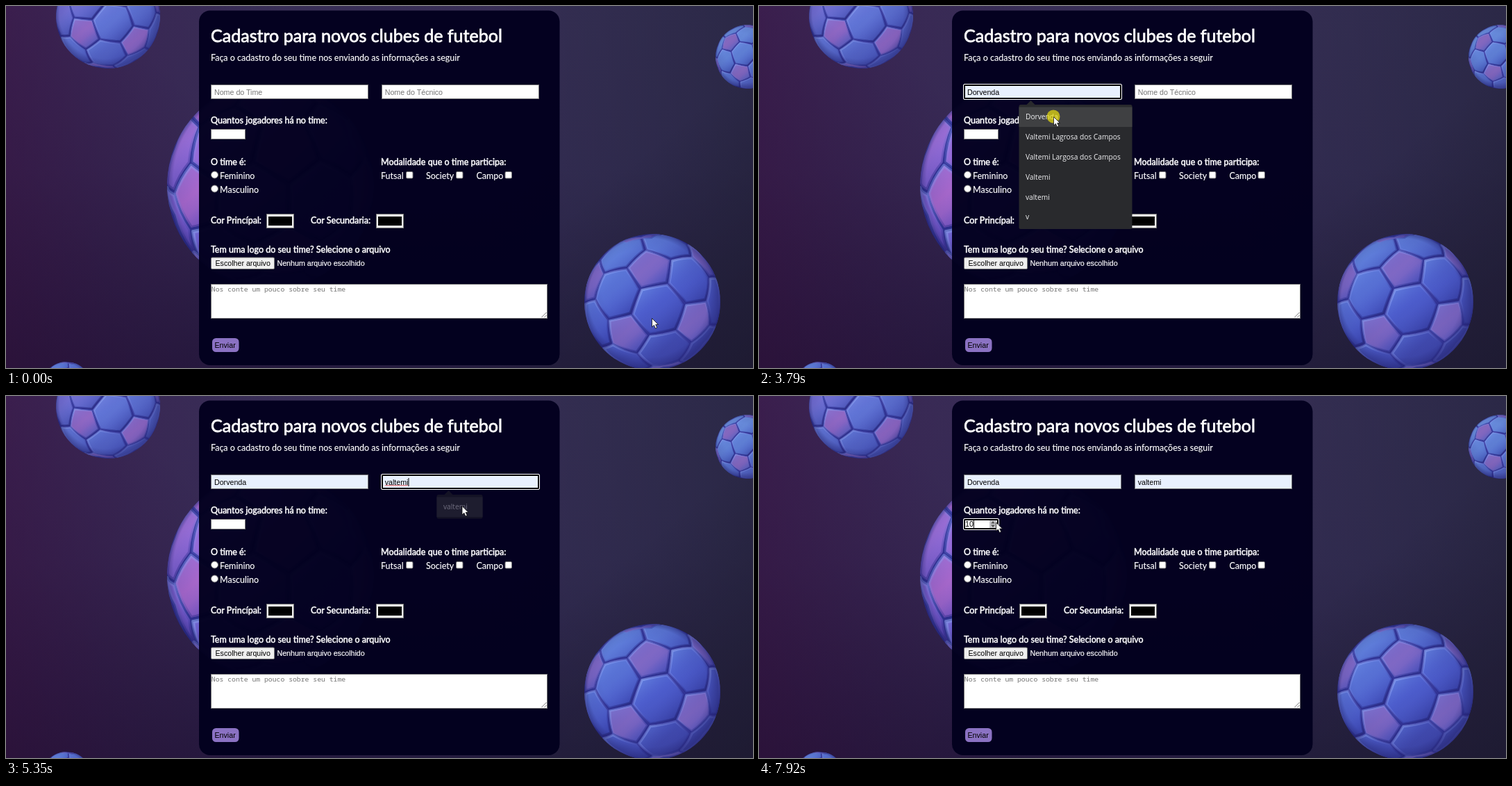
Write an HTML page with a canvas that moves like this. It is 1076 by 521 pixels and loops after 7.99 s.

```html
<!DOCTYPE html>
<html lang="pt-BR">
<head>
<meta charset="utf-8">
<title>Cadastro de clubes</title>
<style>
  html, body { margin: 0; width: 100%; height: 100%; overflow: hidden; background: #2f2650; }
  canvas, svg { position: absolute; left: 0; top: 0; width: 1076px; height: 521px; }
  text { font: 12.5px Lato, sans-serif; fill: #fff; white-space: pre; }
  .title { font-size: 25.05px; stroke: #fff; stroke-width: .8px; }
  .plain text { stroke: #fff; stroke-width: .15px; }
  .label text { stroke: #fff; stroke-width: .5px; }
  .ui text { font: 10.67px "Liberation Sans", Arial, sans-serif; fill: #000; }
  .ui .hint { fill: #757575; }
  .ui .mono { font: 9.78px "Noto Sans Mono", monospace; fill: #757575; }
  .ui .light { fill: #fff; stroke: #fff; stroke-width: .2px; }
  .box { fill: #fff; stroke: #767676; }
  .gray { fill: #efefef; stroke: #767676; }
  .ring .outer { fill: none; stroke: #fff; }
  .ring .inner { fill: none; stroke: #000; stroke-width: 2; }
  .menu text { font: 10.2px "Open Sans", sans-serif; fill: #f1f1f3; }
  .menu .panel { fill: #292a2d; }
  .menu .row { fill: #3f4042; }
</style>
</head>
<body>
<canvas id="scene" width="1076" height="521"></canvas>
<svg viewBox="0 0 1076 521">
  <rect x="278" y="6.5" width="519.5" height="510.5" rx="16" fill="#03001e" fill-opacity=".97"/>
  <text class="title" x="295" y="52">Cadastro para novos clubes de futebol</text>

  <g class="plain">
    <text x="295" y="78.5">Faça o cadastro do seu time nos enviando as informações a seguir</text>
    <text x="308" y="248.5">Feminino</text>
    <text x="308" y="268.5">Masculino</text>
    <text x="540" y="248.5">Futsal</text>
    <text x="605" y="248.5">Society</text>
    <text x="677.5" y="248.5">Campo</text>
  </g>
  <g class="label">
    <text x="295" y="168.5">Quantos jogadores há no time:</text>
    <text x="295" y="228.5">O time é:</text>
    <text x="540" y="228.5">Modalidade que o time participa:</text>
    <text x="295" y="312.5">Cor Princípal:</text>
    <text x="439" y="312.5">Cor Secundaria:</text>
    <text x="295" y="354.5">Tem uma logo do seu time? Selecione o arquivo</text>
  </g>

  <g class="box">
    <circle cx="300.5" cy="243" r="5"/>
    <circle cx="300.5" cy="263" r="5"/>
    <rect x="576.5" y="238.5" width="9.5" height="9.5" rx="1.5"/>
    <rect x="648.5" y="238.5" width="9.5" height="9.5" rx="1.5"/>
    <rect x="719" y="238.5" width="9.5" height="9.5" rx="1.5"/>
    <rect id="field1" x="295.5" y="113.5" width="226" height="20"/>
    <rect id="field2" x="541.5" y="113.5" width="226" height="20"/>
    <rect x="295.5" y="177.5" width="49" height="14"/>
    <rect x="295.5" y="400.5" width="484" height="49"/>
  </g>
  <path d="M771.5 448l7-7M775.5 448l3-3" stroke="#666" stroke-width=".9"/>
  <g class="gray">
    <rect x="375.5" y="299.5" width="39" height="20"/>
    <rect x="533.5" y="299.5" width="39" height="20"/>
    <rect x="295.5" y="362" width="91" height="16.5" rx="1.5"/>
  </g>
  <path d="M378 303h34v13h-34zM536 303h34v13h-34z"/>
  <rect x="297" y="478" width="38.5" height="20" rx="5.5" fill="#8b72c3"/>

  <g class="ui">
    <text x="301.5" y="374">Escolher arquivo</text>
    <text x="390.5" y="374" class="light">Nenhum arquivo escolhido</text>
    <text x="295.8" y="411" class="mono">Nos conte um pouco sobre seu time</text>
    <text x="300.5" y="492">Enviar</text>
    <text id="hint1" x="300" y="127.5" class="hint">Nome do Time</text>
    <text id="hint2" x="545.7" y="127.5" class="hint">Nome do Técnico</text>
    <text id="value1" x="300" y="127.5">Dorvenda</text>
    <text id="value2" x="545.7" y="127.5">valtemi</text>
    <g id="spinner">
      <rect id="spinHover" x="332" y="179" width="10.5" height="11" fill="#c4c4c8"/>
      <path d="M334 183.5l3-3.4 3 3.4zM334 185.5l3 3.4 3-3.4z" fill="#555"/>
    </g>
    <text id="count" x="297" y="188.3"></text>
  </g>
  <path id="squiggle" fill="none" stroke="#e02020" stroke-width=".8"/>

  <g class="ring" id="ring1">
    <rect class="outer" x="294.5" y="112.5" width="228" height="22" rx="1.5"/>
    <rect class="inner" x="296" y="114" width="225" height="19" rx="1"/>
  </g>
  <g class="ring" id="ring2">
    <rect class="outer" x="540.5" y="112.5" width="228" height="22" rx="1.5"/>
    <rect class="inner" x="542" y="114" width="225" height="19" rx="1"/>
  </g>
  <g class="ring" id="ring3">
    <rect class="outer" x="294.5" y="176.5" width="51" height="16" rx="1.5"/>
    <rect class="inner" x="296" y="178" width="48" height="13" rx="1"/>
  </g>
  <rect id="caret" width="1" height="12"/>

  <g class="menu" id="menu1">
    <path class="panel" d="M384.5 143l7-7 7 7z"/>
    <rect class="panel" x="374.5" y="142" width="163" height="179" rx="2.5"/>
    <rect class="row" id="row1" x="374.5" y="145.5" width="163" height="28.5"/>
    <g id="names"></g>
  </g>
  <g class="menu" id="menu2">
    <path class="panel" d="M630.5 143l7-7 7 7z"/>
    <rect class="panel" x="620.5" y="142" width="66" height="34.5" rx="2.5"/>
    <rect class="row" id="row2" x="620.5" y="145.5" width="66" height="28.5"/>
    <text x="630" y="163.3">valtemi</text>
  </g>

  <g id="pointer">
    <circle id="click" r="9.5" fill="#f0e50c" fill-opacity=".68"/>
    <path id="arrow" d="M.5 .5V13l2.9-2.7 2 4.7 2.3-1-2-4.5h3.8z" fill="#fff" stroke="#111" stroke-width=".8"/>
    <path id="beam" d="M-2.5-6h2L0-5.5 .5-6h2M0-5.5v11M-2.5 6h2L0 5.5 .5 6h2" fill="none" stroke="#000"/>
  </g>
</svg>
<script>
const $ = id => document.getElementById(id);

// ---- Backdrop ----
const ctx = $('scene').getContext('2d');

function gradient(shape, stops) {
  const g = shape.length === 4 ? ctx.createLinearGradient(...shape) : ctx.createRadialGradient(...shape);
  stops.forEach(([at, color]) => g.addColorStop(at, color));
  return g;
}

function wash(shape, stops) {
  ctx.fillStyle = gradient(shape, stops);
  ctx.fillRect(0, 0, 1076, 521);
}

const dot = (a, b) => a[0] * b[0] + a[1] * b[1] + a[2] * b[2];
const mix = (a, b, k) => a.map((v, i) => v + (b[i] - v) * k);
const norm = a => a.map(v => v / Math.hypot(...a));
const cross = (a, b) => [a[1] * b[2] - a[2] * b[1], a[2] * b[0] - a[0] * b[2], a[0] * b[1] - a[1] * b[0]];
const lift = ([x, y]) => [x, y, Math.sqrt(Math.max(0, 1 - x * x - y * y))];
const perpendicular = (a, axis) => norm(a.map((v, i) => v - dot(a, axis) * axis[i]));
const adjacent = (a, b) => Math.abs(dot(a, b) - 1 / Math.sqrt(5)) < .01;

// Twelve pentagon centres, turned so one sits at `first` and a neighbour lies towards `second`.
function pentagonCentres(first, second) {
  const z = norm(lift(first)), x = perpendicular(lift(second), z), y = cross(z, x);
  const half = [z];
  for (let k = 0; k < 5; k++) {
    const a = k * Math.PI * .4;
    half.push(z.map((v, i) => (v + 2 * (x[i] * Math.cos(a) + y[i] * Math.sin(a))) / Math.sqrt(5)));
  }
  return [...half, ...half.map(v => v.map(c => -c))];
}

function hexagonCentres(pents) {
  const found = [];
  pents.forEach((a, i) => pents.slice(i + 1).forEach((b, j) => pents.slice(i + j + 2).forEach(c => {
    if (adjacent(a, b) && adjacent(b, c) && adjacent(a, c)) found.push(norm(a.map((v, k) => v + b[k] + c[k])));
  })));
  return found;
}

// Outline of the panel around a centre, pulled in a little and curved along the sphere.
function panel(centre, sides, corners) {
  const u = perpendicular(Math.abs(centre[0]) < .8 ? [1, 0, 0] : [0, 1, 0], centre), w = cross(centre, u);
  const angle = p => Math.atan2(dot(p, w), dot(p, u));
  const own = [...corners].sort((a, b) => dot(b, centre) - dot(a, centre)).slice(0, sides)
    .sort((a, b) => angle(a) - angle(b)).map(p => mix(p, centre, .07));
  const path = new Path2D();
  own.forEach((p, i) => {
    for (let k = 0; k < 4; k++) path.lineTo(...norm(mix(p, own[(i + 1) % sides], k / 4)));
  });
  path.closePath();
  return path;
}

function ball(cx, cy, r, first, second, [light, mid, dark], patch) {
  const pents = pentagonCentres(first, second);
  const corners = pents.flatMap(a => pents.filter(b => adjacent(a, b)).map(b => norm(mix(a, b, 1 / 3))));
  ctx.save();
  ctx.translate(cx, cy);
  ctx.scale(r, r);
  ctx.beginPath();
  ctx.arc(0, 0, 1, 0, 7);
  ctx.clip();
  ctx.fillStyle = '#35379a';
  ctx.fill();
  ctx.lineJoin = 'round';
  const body = gradient([-.6, -.8, .5, 1], [[0, light], [.5, mid], [1, dark]]);

  const drawPanel = (centre, sides) => {
    if (centre[2] < -.1) return;
    const [x, y] = centre, path = panel(centre, sides, corners);
    const across = stops => gradient([x - .26, y - .3, x + .26, y + .3], stops);
    const paint = color => {
      ctx.fillStyle = color;
      ctx.fill(path);
    };
    paint(body);
    if (sides === 5) paint(across([[0, patch], [.6, patch], [1, body === patch ? patch : mid]]));
    paint(across([[0, 'rgba(125,165,245,.34)'], [.45, 'rgba(80,95,215,0)'], [1, 'rgba(30,32,130,.42)']]));
    ctx.lineWidth = .035;
    ctx.strokeStyle = across([[0, 'rgba(150,175,250,.6)'], [.4, 'rgba(130,145,240,.25)'], [.7, 'rgba(40,42,140,.35)'], [1, 'rgba(32,32,110,.6)']]);
    ctx.stroke(path);
  };
  hexagonCentres(pents).forEach(c => drawPanel(c, 6));
  pents.forEach(c => drawPanel(c, 5));

  ctx.fillStyle = gradient([-.25, -.25, .5, 0, 0, 1], [[0, 'rgba(28,26,95,0)'], [.75, 'rgba(28,26,95,.1)'], [1, 'rgba(28,26,95,.5)']]);
  ctx.fillRect(-1, -1, 2, 2);
  ctx.restore();
}

wash([0, 0, 0, 521], [[0, '#393056'], [.45, '#362d54'], [1, '#251d40']]);
wash([0, 0, 400, 0], [[0, 'rgba(66,16,76,.5)'], [1, 'rgba(50,25,85,.05)']]);
wash([0, 521, 330, 180], [[0, 'rgba(30,12,40,.4)'], [1, 'rgba(30,12,40,0)']]);
wash([700, 0, 1076, 0], [[0, 'rgba(36,40,66,0)'], [.3, 'rgba(36,40,66,.3)'], [1, 'rgba(34,36,60,.6)']]);
wash([860, 260, 1076, 521], [[0, 'rgba(26,22,42,0)'], [1, 'rgba(26,22,42,.6)']]);

const blue = ['#6284dc', '#4c5ccb', '#3b409f'];
ball(147, 15, 75, [-.48, .33], [.5, .49], ['#7f68cc', '#6074d4', '#4a58bc'], '#9068c4');
ball(1068, 73, 46, [-.22, .52], [-.55, -.45], ['#6c92dc', '#5a78d0', '#4a52b0'], '#8568be');
ball(381, 258, 149, [-.74, .13], [-.6, -.72], ['#a676dc', '#7758d0', '#5048b8'], '#a868cc');
ball(931, 426, 98, [-.03, -.5], [-.36, .38], blue, '#7f68c4');
ball(87, 549, 37, [.1, -.5], [-.5, .4], blue, '#7b6cc4');

// ---- Form activity ----
['Dorvenda', 'Valtemi Lagrosa dos Campos', 'Valtemi Largosa dos Campos', 'Valtemi', 'valtemi', 'v'].forEach((name, i) => {
  const node = document.createElementNS('http://www.w3.org/2000/svg', 'text');
  node.setAttribute('x', 384);
  node.setAttribute('y', 163.3 + 28.8 * i);
  node.textContent = name;
  $('names').append(node);
});
$('squiggle').setAttribute('d', 'M546 129.5' + 'l1.5-1.5 1.5 1.5'.repeat(11));

const LOOP = 7990;
// start, end, number of steps, destination, downward bend of the path
const moves = [
  [70, 250, 4, [725.5, 307.5], 0],
  [450, 930, 8, [392, 120], 0],
  [3250, 3520, 4, [424, 159], 0],
  [3930, 4200, 5, [614, 124], 0],
  [4800, 5140, 5, [656.5, 158], 0],
  [5480, 6010, 9, [315.5, 182], 24],
  [6080, 6080, 1, [316, 187], 0],
  [6490, 6560, 2, [341, 181.5], 0]
];
const clicks = [[1070, 1140], [3720, 3860], [4400, 4470], [5280, 5350], [6300, 6420],
  [6830, 6900], [6970, 7040], [7110, 7180], [7240, 7310], [7570, 7640], [7710, 7780], [7850, 7920]];
const beams = [[930, 3250], [4200, 4800], [6080, 6490]];
const carets = {
  value1: [[1070, 1590], [2120, 2650], [3180, 3320], [3860, 4400]],
  value2: [[4400, 4930], [5280, 5810]],
  count: [[6830, LOOP]]
};
const counts = [6830, 6970, 7110, 7240, 7570, 7640, 7710, 7780, 7850, 7920];

const within = (t, spans) => spans.some(([from, to]) => t >= from && t < to);
const show = (id, opacity) => { $(id).style.opacity = +opacity; };

function pointerAt(t) {
  let here = [930, 449];
  for (const [start, end, steps, to, bend] of moves) {
    if (t < start) break;
    const step = end > start ? Math.floor((t - start) / (end - start) * (steps - 1) + 1e-6) : 0;
    const k = Math.min(1, (step + 1) / steps), eased = k * k * (3 - 2 * k);
    here = mix(here, to, eased);
    here[1] += bend * Math.sin(Math.PI * eased);
    if (t < end) break;
  }
  return here;
}

function render(t) {
  const [x, y] = pointerAt(t);
  $('pointer').setAttribute('transform', `translate(${x} ${y})`);
  const beam = within(t, beams);
  show('beam', beam);
  show('arrow', !beam);
  show('click', within(t, clicks));

  const filled1 = t >= 3390, filled2 = t >= 4970;
  [[1, filled1], [2, filled2]].forEach(([n, filled]) => {
    show('value' + n, filled);
    show('hint' + n, !filled);
    show('row' + n, filled);
    $('field' + n).style.fill = filled ? '#e8f0fe' : '#fff';
  });
  show('ring1', t >= 1070 && t < 4400);
  show('ring2', t >= 4400 && t < 6300);
  show('ring3', t >= 6300);
  show('menu1', t < 1140 || t >= 3930 ? 0 : t < 3860 ? 1 : .25);
  show('menu2', t < 4470 || t >= 5410 ? 0 : t < 5350 ? 1 : .45);
  show('squiggle', t >= 5280 && t < 6300);
  show('spinner', t >= 6010);
  show('spinHover', t >= 6560);

  const count = counts.filter(at => t >= at).length;
  $('count').textContent = count || '';

  const owner = Object.keys(carets).find(id => within(t, carets[id]));
  show('caret', !!owner);
  if (owner) {
    const text = $(owner), empty = owner === 'value1' && !filled1 || owner === 'value2' && !filled2;
    $('caret').setAttribute('x', +text.getAttribute('x') + (empty ? 0 : text.getComputedTextLength()));
    $('caret').setAttribute('y', owner === 'count' ? 178.5 : 118);
  }
}

const origin = performance.now();
function tick() {
  render((performance.now() - origin) % LOOP);
  requestAnimationFrame(tick);
}
tick();
</script>
</body>
</html>
```
